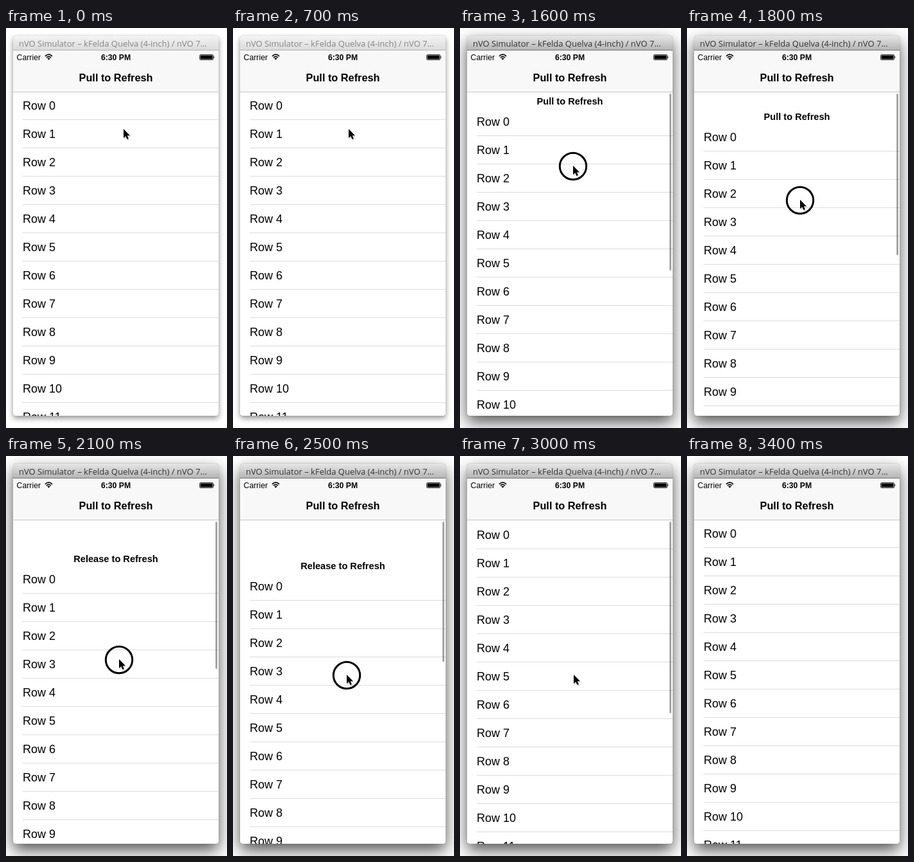
Animation of 344x622 px, one loop 4200 ms. Source, as an HTML page:

```html
<!DOCTYPE html>
<html lang="en">
<head>
<meta charset="utf-8">
<title>Pull to Refresh</title>
<style>
  html, body { margin: 0; width: 100%; height: 100%; overflow: hidden; background: #fff; }
  #window {
    position: absolute; left: 11px; top: 12px; width: 320px; height: 591px;
    border-radius: 5px 5px 4px 4px; overflow: hidden; background: #fff;
    box-shadow: 0 0 1px rgba(0,0,0,.55), 0 4px 9px rgba(0,0,0,.42);
  }
  #window.active { box-shadow: 0 0 1px rgba(0,0,0,.7), 0 10px 25px rgba(0,0,0,.68); }
  svg { display: block; }
  text { font-family: "Liberation Sans", Arial, sans-serif; }
  .bold { font-weight: bold; text-anchor: middle; }
  .row { font-size: 18px; }
  #caption { font: 13px "Open Sans", "Noto Sans", sans-serif; fill: #858585; }
  .active #caption { fill: #333; }
  #bar { fill: url(#idle); }
  .active #bar { fill: url(#focused); }
  #barEdge { fill: #b4b4b4; }
  .active #barEdge { fill: #777; }
</style>
</head>
<body>
<div id="window">
  <svg width="320" height="591" viewBox="11 12 320 591">
    <defs>
      <linearGradient id="idle" x2="0" y2="1">
        <stop stop-color="#f4f4f4"/><stop offset="1" stop-color="#dadada"/>
      </linearGradient>
      <linearGradient id="focused" x2="0" y2="1">
        <stop stop-color="#e6e6e6"/><stop offset="1" stop-color="#b3b3b3"/>
      </linearGradient>
    </defs>

    <rect id="highlight" x="11" y="142" width="320" height="45" fill="#d9d9d9"/>
    <g id="list">
      <text id="hint" class="bold" x="171" y="94" font-size="14.6"></text>
    </g>
    <rect id="scrollbar" x="326" y="102" width="3" rx="1.5" fill="#000" fill-opacity=".35"/>

    <rect x="11" y="35" width="320" height="64" fill="#f8f8f8"/>
    <rect x="11" y="99" width="320" height="1" fill="#c4c4c4"/>
    <text class="bold" x="171" y="83" font-size="16.3">Pull to Refresh</text>

    <text x="16.5" y="50" font-size="12.3">Carrier</text>
    <text class="bold" x="171" y="50" font-size="12.2">6:30 PM</text>
    <g fill="none" stroke="#000" stroke-width="1.7">
      <path d="M61 43.8Q66.5 38.6 72 43.8M63 46.1Q66.5 42.8 70 46.1"/>
      <path d="M64.3 47.3Q66.5 45.6 68.7 47.3L66.5 49.8Z" fill="#000" stroke="none"/>
    </g>
    <rect x="301.5" y="41.5" width="21" height="8" rx="1.5" fill="none" stroke="#000" stroke-width=".8"/>
    <rect x="302.5" y="42.5" width="19" height="6" rx=".6"/>
    <path d="M323.5 43.8q2 1.7 0 3.4z"/>

    <rect id="bar" x="11" y="12" width="320" height="23"/>
    <rect id="barEdge" x="11" y="34" width="320" height="1"/>
    <text id="caption" x="20" y="28.5">nVO Simulator – kFelda Quelva (4-inch) / nVO 7...</text>

    <g id="pointer">
      <circle id="ring" cy="1" r="20.7" fill="none" stroke="#000" stroke-width="3"/>
      <path d="M1 2V16L4.3 13L6.5 18L9 17L6.8 12H11Z" fill="#000" opacity=".2"/>
      <path d="M0 0V14L3.2 11L5.4 16L7.9 15L5.7 10.2H10Z" stroke="#fff" stroke-width="1" paint-order="stroke"/>
    </g>
  </svg>
</div>

<script>
const LOOP = 4200, STEP = 100, ROW_HEIGHT = 44;
const PRESS = 1100, DRAG = 1400, RELEASE = 2680, END = 3400;
const pointerX = [[600, 183], [700, 180], [800, 178], [900, 176], [1900, 176], [2400, 177]];
const pointerY = [[1300, 157], [1400, 166], [1600, 214], [1800, 267], [2000, 304], [2200, 328], [2400, 339], [2500, 340]];
const $ = id => document.getElementById(id);
const show = (id, visible) => $(id).setAttribute("visibility", visible ? "visible" : "hidden");

function add(tag, attributes, content = "") {
  const node = document.createElementNS("http://www.w3.org/2000/svg", tag);
  for (const name in attributes) node.setAttribute(name, attributes[name]);
  node.textContent = content;
  $("list").append(node);
}

for (let i = 0; i < 12; i++) {
  const top = 99 + i * ROW_HEIGHT;
  add("text", { class: "row", x: 26, y: top + 28 }, "Row " + i);
  add("rect", { x: 26, y: top + 43, width: 305, height: 1, fill: "#dcdcdc" });
}

function track(points, time) {
  const next = points.findIndex(([t]) => t > time);
  if (next < 0) return points[points.length - 1][1];
  if (next === 0) return points[0][1];
  const [t0, a] = points[next - 1], [t1, b] = points[next];
  return a + (b - a) * (time - t0) / (t1 - t0);
}

// The list follows the drag with resistance, then springs back critically damped.
function pullDistance(time, y) {
  if (time < DRAG) return 0;
  const pulled = (y - 157) * 0.447;
  if (time < RELEASE) return pulled;
  const phase = (time - RELEASE) * 0.018;
  return pulled * (1 + phase) * Math.exp(-phase);
}

function draw(time) {
  const x = track(pointerX, time), y = track(pointerY, time);
  const pull = Math.round(pullDistance(time, y));
  $("window").classList.toggle("active", time >= PRESS);
  show("highlight", time >= 1300 && time < DRAG);
  show("ring", time >= PRESS && time < RELEASE);
  show("pointer", time < END);
  if (time >= END) show("ring", false);
  $("pointer").setAttribute("transform", `translate(${Math.round(x)} ${Math.round(y)})`);
  $("list").setAttribute("transform", `translate(0 ${pull})`);
  $("hint").textContent = pull > 65 ? "Release to Refresh" : "Pull to Refresh";
  $("scrollbar").setAttribute("height", 300 - pull);
  const fade = Math.min(1, Math.max(0, (END - time) / 300));
  $("scrollbar").setAttribute("opacity", time < DRAG ? 0 : fade);
}

const start = performance.now();
function tick() {
  const time = (performance.now() - start) % LOOP;
  draw(Math.floor(time / STEP) * STEP);
  requestAnimationFrame(tick);
}
tick();
</script>
</body>
</html>
```
